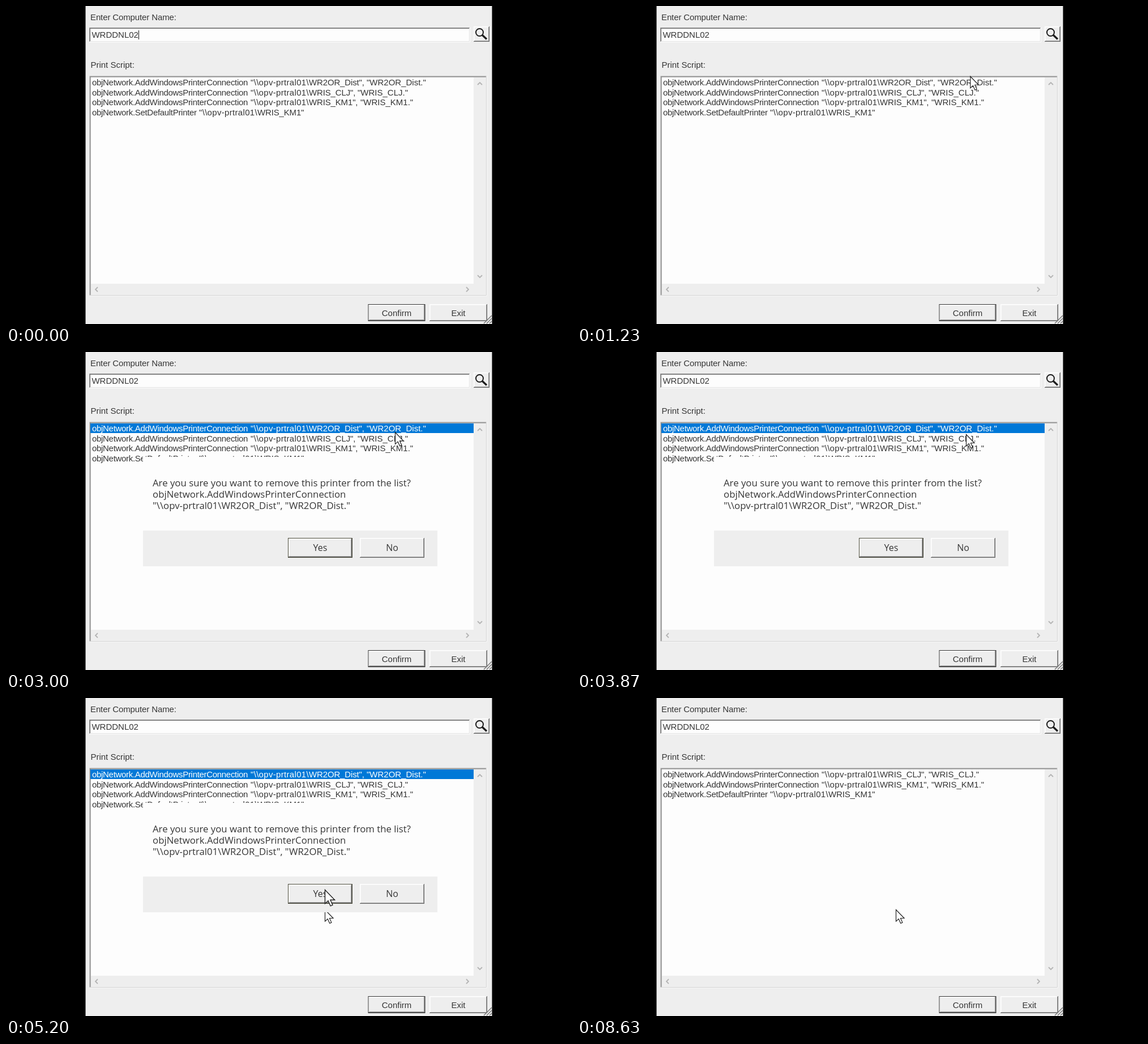
Recreate the animation shown at these times as an HTML page with a canvas. Size 998 px wide and 561 px high, loop 8730 ms.

```html
<!DOCTYPE html>
<html lang="en">
<head>
<meta charset="utf-8">
<title>Print script</title>
<style>
html, body { margin: 0; width: 100%; height: 100%; overflow: hidden; background: #000; }
canvas { display: block; }
</style>
</head>
<body>
<canvas id="stage" width="998" height="561"></canvas>
<script>
const ctx = document.getElementById('stage').getContext('2d');
const LOOP = 8730, SELECT = 2400, OPEN = 2830, CLOSE = 6430;
const FACE = '#eee', PAPER = '#fdfdfd', INK = '#363636';
const SANS = '15px "Liberation Sans", Arial, sans-serif';
const UI = '"Open Sans", "Noto Sans", sans-serif';
const DIALOG = [242, 185, 520, 193];
const HOST = '"\\\\opv-prtral01\\';
const ADD = 'objNetwork.AddWindowsPrinterConnection';

// command, x of the path, share name, alias, x of the alias
const ROWS = [
  [ADD, 432, 'WR2OR_Dist",', '"WR2OR_Dist."', 637],
  [ADD, 432, 'WRIS_CLJ",', '"WRIS_CLJ."', 621],
  [ADD, 432, 'WRIS_KM1",', '"WRIS_KM1."', 626],
  ['objNetwork.SetDefaultPrinter', 341, 'WRIS_KM1"', '', 0]
];

// time, x, y of the pointer tip
const PATH = [
  [300, 775, -26], [730, 713, 100], [1500, 687, 133], [2830, 687, 133],
  [3100, 687, 145], [4100, 687, 145], [5000, 563, 373], [LOOP, 563, 373]
];

function rect(x, y, w, h, color) {
  ctx.fillStyle = color;
  ctx.fillRect(x, y, w, h);
}

function text(s, x, y, color = INK, font = SANS, spacing = 0, align = 'left') {
  ctx.font = font;
  ctx.letterSpacing = spacing + 'px';
  ctx.textAlign = align;
  ctx.fillStyle = color;
  ctx.fillText(s, x, y);
}

function line(points, color, width) {
  ctx.beginPath();
  points.forEach(([x, y]) => ctx.lineTo(x, y));
  ctx.strokeStyle = color;
  ctx.lineWidth = width;
  ctx.stroke();
}

function bevel(x, y, w, h, light, dark) {
  rect(x, y, w, h, dark);
  rect(x, y, w - 1, h - 1, light);
}

function raised(x, y, w, h) {
  bevel(x, y, w, h, '#fff', '#666');
  bevel(x + 1, y + 1, w - 2, h - 2, '#f8f8f8', '#a0a0a0');
  rect(x + 2, y + 2, w - 4, h - 4, FACE);
}

function sunken(x, y, w, h) {
  bevel(x, y, w, h, '#999', '#fff');
  bevel(x + 1, y + 1, w - 2, h - 2, '#6c6c6c', '#e0e0e0');
  rect(x + 2, y + 2, w - 4, h - 4, PAPER);
}

function button(label, x, y, w, h, font, edge) {
  if (edge) {
    rect(x, y, w, h, edge);
    raised(x + 1, y + 1, w - 2, h - 2);
  } else raised(x, y, w, h);
  text(label, x + w / 2, y + h / 2 + 5.5, INK, font, 0, 'center');
}

function chevron(x, y, dx, dy) {
  line([[x - 4 * dy - 2 * dx, y - 4 * dx - 2 * dy], [x + 2 * dx, y + 2 * dy],
        [x + 4 * dy - 2 * dx, y + 4 * dx - 2 * dy]], '#b4b4b4', 1.8);
}

function pointer(x, y, scale = 1) {
  ctx.save();
  ctx.translate(x + .5, y + .5);
  ctx.scale(scale, scale);
  ctx.beginPath();
  [[0, 0], [0, 20.5], [4.7, 16.3], [8.2, 24], [11.4, 22.6], [8, 15], [14.5, 15]]
    .forEach(p => ctx.lineTo(...p));
  ctx.closePath();
  ctx.fillStyle = '#fff';
  ctx.strokeStyle = '#222';
  ctx.lineWidth = 1.2;
  ctx.fill();
  ctx.stroke();
  ctx.restore();
}

function pointerAt(t) {
  if (t < PATH[0][0]) return null;
  const i = PATH.findIndex(p => p[0] > t);
  const [t0, x0, y0] = PATH[i - 1], [t1, x1, y1] = PATH[i];
  const u = (t - t0) / (t1 - t0), e = u * u * (3 - 2 * u);
  return [x0 + (x1 - x0) * e, y0 + (y1 - y0) * e];
}

function drawForm(t) {
  rect(0, 0, 998, 561, '#000');
  rect(140.5, 0, 718, 561, FACE);
  text('Enter Computer Name:', 149, 25, INK, SANS, -.12);
  sunken(147, 38, 673, 26);
  text('WRDDNL02', 151.4, 56);
  if (t < SELECT && (t + 430) % 1060 < 530) rect(234, 43, 1, 16, '#111');

  raised(826, 36, 28, 27);
  ctx.beginPath();
  ctx.arc(836.5, 46.5, 6.5, 0, 7);
  ctx.strokeStyle = '#1c1c1c';
  ctx.lineWidth = 2;
  ctx.stroke();
  line([[841, 51], [849, 58.5]], '#1c1c1c', 3.2);

  text('Print Script:', 149.4, 109);
  sunken(147.5, 123.5, 702, 388);
  rect(826, 126, 22, 384, FACE);
  rect(150, 490, 698, 20, FACE);
  chevron(837, 137, 0, -1);
  chevron(837, 477, 0, 1);
  chevron(160, 500, -1, 0);
  chevron(815, 500, 1, 0);

  button('Confirm', 639.5, 526, 101, 30, SANS, '#333');
  button('Exit', 748, 526, 102, 30, SANS);
  for (const d of [4, 9, 14]) line([[858 - d, 560], [858, 560 - d]], '#777', 1.5);
}

function drawRows(t) {
  const selected = t >= SELECT && t < CLOSE;
  if (selected) rect(149, 126, 677, 17, '#0078d7');
  ROWS.slice(t < CLOSE ? 0 : 1).forEach(([command, x, share, alias, aliasX], i) => {
    const y = 140 + 17.6 * i, color = selected && !i ? '#fff' : INK;
    text(command, 152, y, color, SANS, -.31);
    text(HOST, x, y, color, SANS, .32);
    text(share, x + 103, y, color, SANS, -.15);
    text(alias, aliasX, y, color);
  });
}

function drawDialog(tip) {
  const body = '16.8px ' + UI;
  ctx.save();
  ctx.beginPath();
  ctx.rect(...DIALOG);
  ctx.clip();
  rect(...DIALOG, PAPER);
  rect(242, 315, 520, 63, FACE);
  text('Are you sure you want to remove this printer from the list?', 259, 237, INK, body);
  text(ADD, 259, 257, INK, body);
  text(HOST + 'WR2OR_Dist", "WR2OR_Dist."', 259, 276.5, INK, body);
  button('Yes', 498, 328, 114, 35, '16px ' + UI, '#4c4c3c');
  button('No', 625, 328, 114, 35, '16px ' + UI);
  // the dialog carries its own, slightly larger pointer
  pointer(tip[0], tip[1] - 35, 1.18);
  ctx.restore();
}

function draw(t) {
  const tip = pointerAt(t);
  drawForm(t);
  drawRows(t);
  if (tip) pointer(...tip);
  if (t >= OPEN && t < CLOSE) drawDialog(tip);
}

const start = performance.now();
function tick() {
  draw((performance.now() - start) % LOOP);
  requestAnimationFrame(tick);
}
tick();
</script>
</body>
</html>
```
